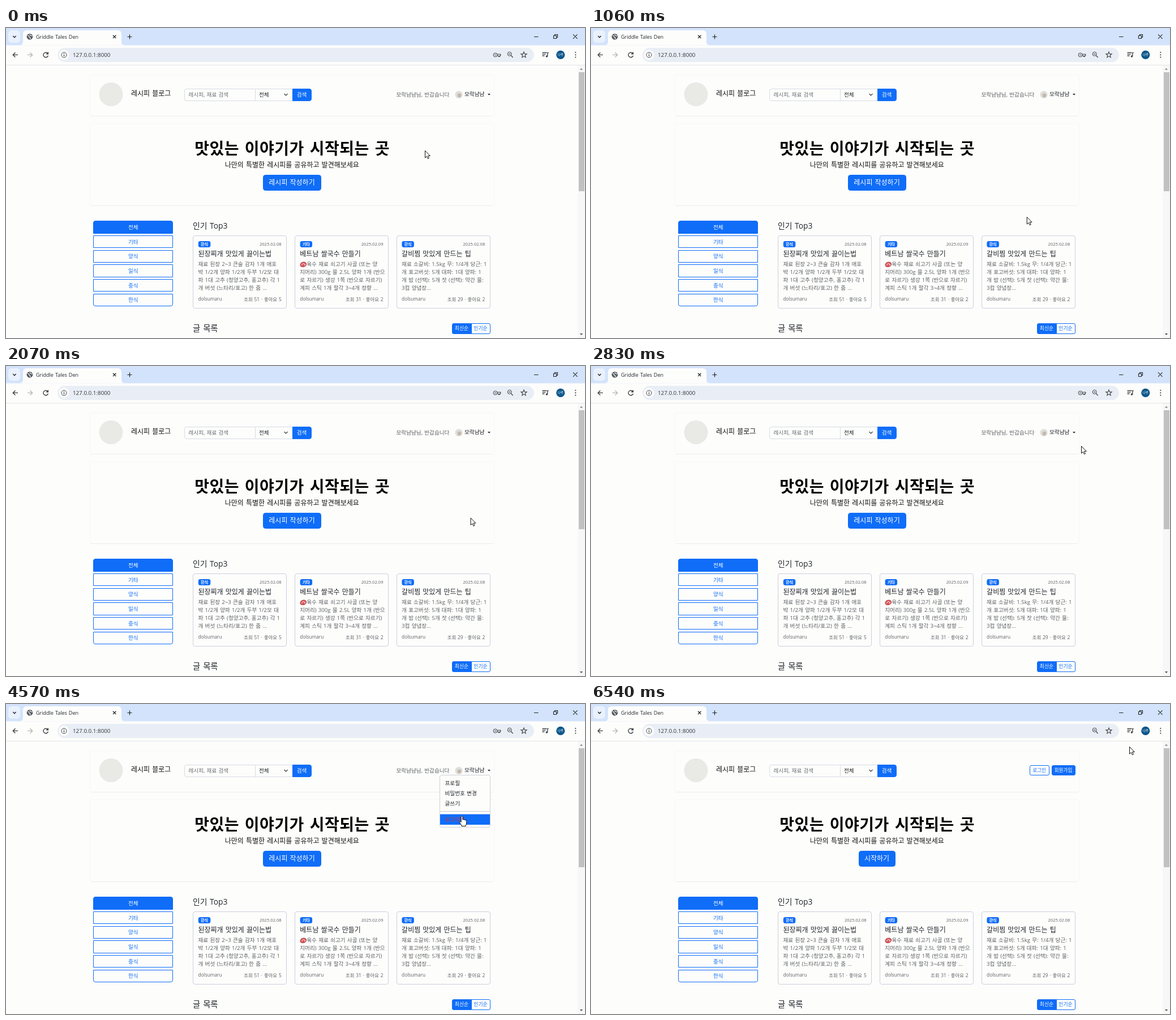
An HTML page for the animation above (6.58 s loop, 1023 by 547 pixels).

```html
<!DOCTYPE html>
<html lang="ko">
<head>
<meta charset="utf-8">
<style>
  html, body { margin: 0; width: 100%; height: 100%; overflow: hidden; background: #fdfdfc; }
  svg { display: block; width: 100vw; height: 100vh; }
  text { font-family: "Open Sans", "Noto Sans CJK KR", "Noto Sans CJK", sans-serif; word-spacing: .08em; white-space: pre; }
  #headline { letter-spacing: .03em; }
</style>
</head>
<body>
<svg id="stage" viewBox="0 0 1023 547"></svg>
<script>
const LOOP = 6580;
const BLUE = '#0f6df8', INK = '#212529', MUTED = '#5c5f62', PAGE = '#fdfdfc', ICON = '#3c4043';

// Text is placed by its vertical middle.
const text = (x, y, str, size = 9.6, fill = INK, anchor = 'start', weight = 400) =>
  `<text x="${x}" y="${y + size * .36}" font-size="${size}" fill="${fill}" text-anchor="${anchor}" font-weight="${weight}">${str}</text>`;
const mid = (x, y, str, size, fill, weight) => text(x, y, str, size, fill, 'middle', weight);
const rect = (x, y, w, h, fill, r = 0) =>
  `<rect x="${x}" y="${y}" width="${w}" height="${h}" rx="${r}" fill="${fill}"/>`;
const circle = (x, y, r, fill, stroke = 'none') =>
  `<circle cx="${x}" cy="${y}" r="${r}" fill="${fill}" stroke="${stroke}"/>`;
const line = (d, stroke = ICON, width = 1.2, fill = 'none') =>
  `<path d="${d}" fill="${fill}" stroke="${stroke}" stroke-width="${width}"/>`;
const group = (id, body) => `<g id="${id}">${body}</g>`;
const snap = v => Math.floor(v) + .5;

// Bordered box with separate corner radii, its border on whole pixels.
function box(x, y, w, h, fill, stroke, radii = 3.5) {
  const [a, b, c, d] = Array.isArray(radii) ? radii : [radii, radii, radii, radii];
  const l = snap(x), t = snap(y), r = snap(x + w), m = snap(y + h);
  const arc = (q, dx, dy) => q ? `a${q} ${q} 0 0 1 ${dx * q} ${dy * q}` : '';
  return line(`M${l + a} ${t}H${r - b}${arc(b, 1, 1)}V${m - c}${arc(c, -1, 1)}` +
    `H${l + d}${arc(d, -1, -1)}V${t + a}${arc(a, 1, -1)}Z`, stroke, 1, fill);
}
function button(x, y, w, h, label, filled, size, radii) {
  return box(x, y, w, h, filled ? BLUE : PAGE, BLUE, radii) +
    mid(x + w / 2, y + h / 2, label, size, filled ? '#fff' : BLUE);
}

function browser() {
  const star = Array.from({ length: 10 }, (_, i) => {
    const a = i * Math.PI / 5 - Math.PI / 2, r = i % 2 ? 2.3 : 5.4;
    return `${915 + r * Math.cos(a)} ${47.5 + r * Math.sin(a)}`;
  }).join('L');
  return rect(0, 0, 1023, 31, '#d3e3fb') +
    rect(4, 4, 21, 22, '#e9f1fd', 6) + line('M12.3 14l2.7 2.7 2.7-2.7', INK, 1.4) +
    `<path d="M24 30.5Q30 30 30 24V11Q30 4 37 4H197Q204 4 204 11V24Q204 30 210 30.5Z" fill="${PAGE}"/>` +
    circle(42, 15.3, 5.4, '#54585d') +
    line('M38 13.4q3 .2 3 2.2t2 1.6v2.6M42.5 10.8q-.8 2.4 1.6 2.6l2.6 1', '#e8eaed', 1.3) +
    text(53, 15.5, 'Griddle Tales Den', 9, INK) +
    line('M189 12.7l5.4 5.4m0-5.4l-5.4 5.4', INK, 1.3) +
    line('M214.5 15.5h8M218.5 11.5v8', INK, 1.2) +
    line('M933 15.5h7.5M967.5 13.5h5v5h-5zM969.5 13.5v-2h5v5h-2M1002 11.4l7.5 7.5m0-7.5l-7.5 7.5', INK, 1.1) +
    rect(0, 30.5, 1023, 35, PAGE) + rect(0, 65, 1023, 1, '#e2e5ea') +
    line('M21 47.4h-8.5m4-4.2l-4.2 4.2 4.2 4.2', ICON, 1.4) +
    line('M38 47.4h8.5m-4-4.2l4.2 4.2-4.2 4.2', '#b4b7ba', 1.4) +
    line('M73.8 45a4.3 4.3 0 1 0 .6 3.8M74.4 42.5v3.2h-3.2', ICON, 1.4) +
    rect(91, 35, 842, 25, '#e9eef6', 12.5) + circle(102.5, 47.5, 9, PAGE) +
    circle(102.5, 47.5, 4.6, 'none', ICON) + line('M102.5 46.8v3.2M102.5 44.7v1.2', ICON, 1.2) +
    text(118, 47.5, '127.0.0.1:8000', 9.8, '#303336') +
    group('key', circle(864.5, 47.5, 3.4, 'none', ICON) + circle(864.5, 47.5, 1.1, ICON) +
      line('M867.8 46.2h6v2.6h-1.3v1.6h-2.4v-1.6h-2.2', ICON, 1.1)) +
    circle(889.7, 45.8, 3.5, 'none', ICON) + line('M892.3 48.4l3.3 3.6M888 45.8h3.4', ICON, 1.3) +
    line(`M${star}Z`, ICON, 1.1) +
    line('M947.5 43.5h8M947.5 46.3h6M947.5 49h4M956.8 50v-6.3h2', ICON, 1.3) + circle(955.4, 50, 1.7, ICON) +
    circle(979.8, 47.4, 7.6, '#0b568a') + mid(979.8, 47.3, '나루', 5.6, '#fff') +
    [43, 47.3, 51.6].map(y => circle(1006.3, y, 1.1, ICON)).join('') +
    rect(1010, 66, 13, 481, '#f7f7f7') + rect(1012, 78, 10, 210, '#c1c1c1') +
    '<path d="M1013.8 73.8l2.7-3 2.7 3z" fill="#8a8a8a"/><path d="M1013.8 539l2.7 3 2.7-3z" fill="#555"/>';
}

const panel = (y, h) => box(148, y, 714, h, 'none', '#f7f7f4', 3) +
  line(`M150 ${snap(y + h)}H860`, '#ecece6', 1);

function header() {
  return panel(82, 73) + circle(185.5, 117, 21, '#e9eae6') +
    text(221, 116, '레시피 블로그', 12, '#111') +
    box(315, 107, 125, 21, PAGE, '#d8dbe2', [3.5, 0, 0, 3.5]) + text(322.5, 117.7, '레시피, 재료 검색', 9.6, '#6a6d71') +
    box(440, 107, 66, 21, PAGE, '#d8dbe2', 0) + text(447, 117.7, '전체') +
    line('M491.5 116l3 3 3-3', '#343a40', 1.2) +
    button(506, 107, 33, 21, '검색', true, 9.6, [0, 3.5, 3.5, 0]) +
    group('member', text(689.5, 117.5, '모락냠냠님, 반갑습니다', 9.6, MUTED) +
      circle(800, 117.5, 6.6, '#dedfda') + circle(801, 119, 3.4, '#c4b9ad') +
      text(810, 117, '모락냠냠') + `<path d="M851 116h5l-2.5 2.8z" fill="${INK}"/>`) +
    group('guest', button(775, 108, 34, 17, '로그인', false, 8.6, 2.5) +
      button(814, 108, 41, 17, '회원가입', true, 8.6, 2.5));
}

function hero() {
  return panel(168, 145) + group('headline', mid(505.6, 213.2, '맛있는 이야기가 시작되는 곳', 28, '#000', 700)) +
    mid(505.3, 241.8, '나만의 특별한 레시피를 공유하고 발견해보세요', 12, '#111') +
    group('write', button(454, 259, 102, 27, '레시피 작성하기', true, 12, 4)) +
    group('start', button(473, 259, 64, 27, '시작하기', true, 12, 4));
}

function sidebar() {
  return ['전체', '기타', '양식', '일식', '중식', '한식'].map((label, i) =>
    button(154.8, 340.8 + 25.7 * i, 140, 21.3, label, i === 0, 9.6,
      i === 0 ? [3.5, 3.5, 0, 0] : i === 5 ? [0, 0, 3.5, 3.5] : 0)).join('');
}

const cards = [
  { tag: '한식', date: '2025.02.08', title: '된장찌개 맛있게 끓이는법', views: 51, likes: 5, lines: [
    '재료 된장 2~3 큰술 감자 1개 애호', '박 1/2개 양파 1/2개 두부 1/2모 대',
    '파 1대 고추 (청양고추, 홍고추) 각 1', '개 버섯 (느타리/표고) 한 줌 ...'] },
  { tag: '기타', date: '2025.02.09', title: '베트남 쌀국수 만들기', views: 31, likes: 2, meat: true, lines: [
    '육수 재료 쇠고기 사골 (또는 양', '지머리) 300g 물 2.5L 양파 1개 (반으',
    '로 자르기) 생강 1쪽 (반으로 자르기)', '계피 스틱 1개 팔각 3~4개 정향 ...'] },
  { tag: '한식', date: '2025.02.08', title: '갈비찜 맛있게 만드는 팁', views: 29, likes: 2, lines: [
    '재료 소갈비: 1.5kg 무: 1/4개 당근: 1', '개 표고버섯: 5개 대파: 1대 양파: 1',
    '개 밤 (선택): 5개 잣 (선택): 약간 물:', '3컵 양념장...'] },
];
const meatIcon = (x, y) =>
  `<g transform="translate(${x} ${y})">` +
  line('M-5.2 2.6Q-6-3 0-4Q5.5-4.5 5.3.5Q4 4.6-1.5 4.5Q-4.4 4.6-5.2 2.6Z', '#a5323c', .8, '#d9545c') +
  line('M-3 2q1-3.4 5-3.6', '#f5c4c0', 1.1) + circle(2.6, .6, 1.2, '#f7e4dc') + '</g>';

function card(c, i) {
  const x = 330.7 + 179.8 * i, left = x + 8.8, right = x + 156;
  return box(x, 366, 165, 128, PAGE, '#cdcee0', 3.5) +
    rect(left + .3, 376, 21.5, 11, BLUE, 3.5) + mid(left + 11, 381.4, c.tag, 7.2, '#fff', 700) +
    text(right, 381.2, c.date, 7.6, MUTED, 'end') + text(left, 399, c.title, 12) +
    (c.meat ? meatIcon(left + 6, 417) : '') +
    c.lines.map((s, n) => text(left + (c.meat && !n ? 12 : 0), 416.6 + 13.85 * n, s, 9.6, MUTED)).join('') +
    text(left, 478.5, 'dolsumaru', 8.3, MUTED) +
    text(right, 478.5, `조회 ${c.views} · 좋아요 ${c.likes}`, 8.4, MUTED, 'end');
}

const rowY = [140, 158, 176, 203.5];
function menu() {
  return box(766, 125, 89, 92, PAGE, '#cfd0d6', 3.5) + '<rect id="hover" x="767" width="88"/>' +
    line('M767 189.5H855', '#c8c9cc', 1) +
    ['프로필', '비밀번호 변경', '글쓰기', '로그아웃'].map((s, i) =>
      text(775.5, rowY[i], s, 9.6, i === 3 ? '#cf2f45' : INK)).join('');
}

const ARROW = 'M0 0V12.6L2.9 9.9 4.9 14.2 6.9 13.3 5 9.1H8.8Z';
const HAND = 'M-1.4 1.2Q0-.8 1.4 1.2V6.5Q2.9 5.6 4 7Q5.4 6.2 6.4 7.6Q8 7.2 8.2 9V12.5Q8 15 6.8 16.5V18' +
  'H-.6V16.5Q-2.5 14.2-4.4 10.8Q-4.6 8.8-2.8 9.6L-1.4 11Z';

document.getElementById('stage').innerHTML = rect(0, 0, 1023, 547, PAGE) + browser() + header() + hero() + sidebar() +
  text(330, 348.6, '인기 Top3', 13.8) + cards.map(card).join('') + text(330, 530, '글 목록', 14.4) +
  button(788, 521, 34, 18, '최신순', true, 8.8, [2.5, 0, 0, 2.5]) +
  button(822, 521, 33, 18, '인기순', false, 8.8, [0, 2.5, 2.5, 0]) +
  group('menu', menu()) +
  '<path id="cursor" fill="#fff" stroke="#111" stroke-width="1" stroke-linejoin="round"/>';

const $ = Object.fromEntries([...document.querySelectorAll('[id]')].map(el => [el.id, el]));
const show = (el, on) => el.setAttribute('display', on ? 'inline' : 'none');

// Pointer stops: time, x, y.
const stops = [
  [0, 740.5, 216.5], [660, 741.5, 320], [1330, 786, 341], [1460, 786, 341], [1560, 796, 338],
  [2830, 866.5, 141.5], [3150, 846, 115], [3400, 846, 115], [3830, 828, 161],
  [4350, 805.5, 197.5], [5350, 805.5, 197.5], [6100, 958, 82], [6500, 951.5, 75.5], [LOOP, 951.5, 75.5],
];
function pointer(t) {
  const i = stops.findIndex(s => s[0] > t);
  const [t0, x0, y0] = stops[i - 1], [t1, x1, y1] = stops[i];
  const u = (t - t0) / (t1 - t0), k = u * u * (3 - 2 * u);
  return [x0 + (x1 - x0) * k, y0 + (y1 - y0) * k];
}

const MENU_OPEN = 3300, PRESS = 4450, RELEASE = 4780, SIGNED_OUT = 4920;
function render(t) {
  const [x, y] = pointer(t);
  const signedIn = t < SIGNED_OUT, open = signedIn && t >= MENU_OPEN;
  for (const id of ['member', 'write', 'key']) show($[id], signedIn);
  for (const id of ['guest', 'start']) show($[id], !signedIn);
  show($.menu, open);

  const row = open ? rowY.findIndex(c => Math.abs(y - c) < 9) : -1;
  show($.hover, row >= 0);
  if (row >= 0) {
    const pressed = t >= PRESS && t < RELEASE;
    $.hover.setAttribute('y', rowY[row] - 9);
    $.hover.setAttribute('height', pressed ? 18.5 : 18);
    $.hover.setAttribute('fill', pressed ? BLUE : '#f4f5f7');
  }
  const overName = signedIn && x > 792 && x < 857 && y > 106 && y < 126;
  $.cursor.setAttribute('d', row >= 0 || overName ? HAND : ARROW);
  $.cursor.setAttribute('transform', `translate(${x} ${y})`);
}

const began = performance.now();
function tick() {
  render((performance.now() - began) % LOOP);
  requestAnimationFrame(tick);
}
tick();
</script>
</body>
</html>
```
